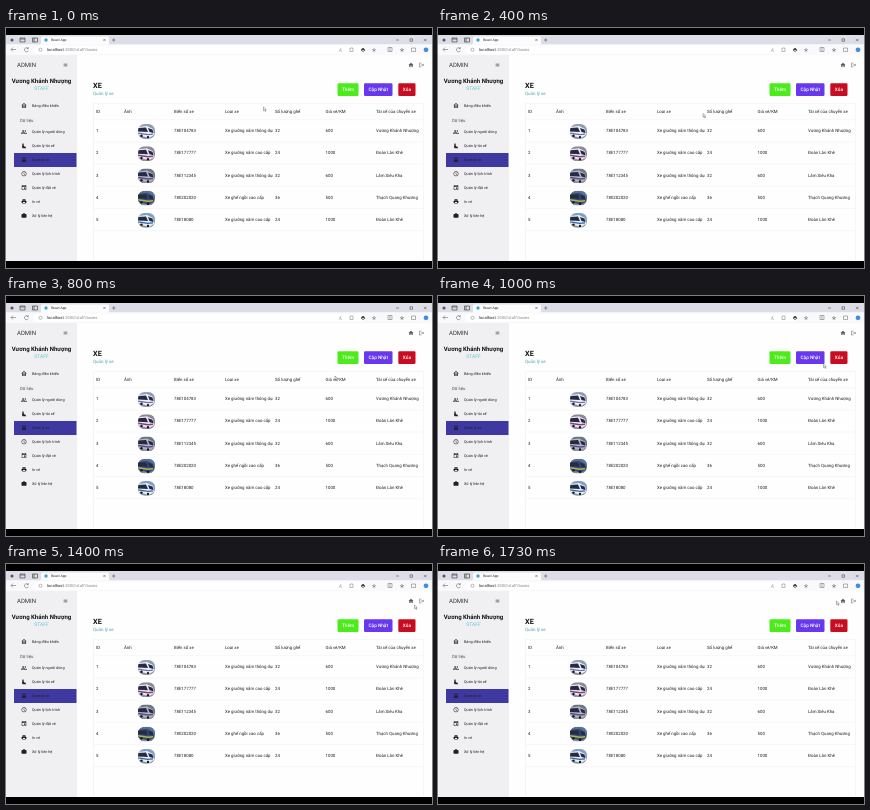
Write an HTML page that moves like this. It is 426 px wide and 240 px high and loops after 1790 ms.

```html
<!DOCTYPE html>
<html lang="vi">
<head>
<meta charset="utf-8">
<title>React App</title>
<style>
html, body { margin: 0; width: 100%; height: 100%; overflow: hidden; background: #000; }
svg { display: block; width: 100vw; height: 100vh; }
text { font-family: Roboto, "Noto Sans", sans-serif; text-rendering: geometricPrecision; white-space: pre; }
</style>
</head>
<body>
<svg id="stage" viewBox="0 0 426 240">
  <clipPath id="photo"><rect width="17" height="14.6" rx="6.5"/></clipPath>
  <clipPath id="type"><rect x="215" y="75" width="51.6" height="158"/></clipPath>
</svg>
<script>
const stage = document.getElementById('stage');
const INK = '#202124', LINE = '#efeff2';

function add(tag, attrs, parent = stage) {
  const el = document.createElementNS('http://www.w3.org/2000/svg', tag);
  for (const key in attrs) el.setAttribute(key, attrs[key]);
  return parent.appendChild(el);
}
const rect = (x, y, width, height, fill, rx = 0, parent) =>
  add('rect', { x, y, width, height, fill, rx }, parent);
const dot = (cx, cy, r, fill, parent) => add('circle', { cx, cy, r, fill }, parent);
const shape = (d, fill, parent) => add('path', { d, fill }, parent);
const stroke = (d, color = '#555', width = .6, parent) =>
  add('path', { d, fill: 'none', stroke: color, 'stroke-width': width }, parent);
function label(x, y, size, content, fill = INK, more = {}) {
  add('text', { x, y, 'font-size': size, fill, ...more }).textContent = content;
}
// Icons are drawn on a 24-unit grid, centred on (x, y).
function icon(name, x, y, size = 6, fill = INK) {
  add('path', {
    d: icons[name], fill, 'fill-rule': 'evenodd',
    transform: `translate(${x - size / 2} ${y - size / 2}) scale(${size / 24})`
  });
}
const icons = {
  home: 'M10 20v-6h4v6h5v-8h3L12 3 2 12h3v8z',
  house: 'M12 2L1 12h3v9h7v-6h2v6h7v-9h3zM7 18v-8l5-4.3 5 4.3v8h-2v-6H9v6z',
  people: 'M9 4a4 4 0 1 0 .01 0zm0 2a2 2 0 1 1-.01 0zM1 20v-3c0-5 16-5 16 0v3zm2-2h12c0-4-12-4-12 0zM15 4c6 0 6 8 0 8 2-2 2-6 0-8zM18 14c3 .5 5 2 5 4v2h-4v-3z',
  driver: 'M8 2a3 3 0 1 0 .01 0zM5 9h6l2 5h4l4 7H7l-3-4z',
  bus: 'M4 16c0 1 .4 1.7 1 2.2V21h3v-2h8v2h3v-2.8c.6-.5 1-1.2 1-2.2V6c0-3.5-3.6-4-8-4s-8 .5-8 4zM6 6h12v5H6z',
  clock: 'M12 2a10 10 0 1 0 .01 0zm0 2a8 8 0 1 1-.01 0zM11 6h2v6l4 3-1 1.5-5-3.5z',
  event: 'M19 4h-1V2h-2v2H8V2H6v2H3v18h18V4zm0 16H5V9h14zM12 12h5v5h-5z',
  print: 'M19 8H5l-3 3v6h4v4h12v-4h4v-6zM16 19H8v-5h8zM18 3H6v4h12z',
  work: 'M20 6h-4V4l-2-2h-4L8 4v2H4L2 8v11l2 2h16l2-2V8zM14 6h-4V4h4z',
  exit: 'M17 7l-1.4 1.4 2.6 2.6H8v2h10.2l-2.6 2.6L17 17l5-5zM4 5h8V3H4L2 5v14l2 2h8v-2H4z',
  menu: 'M3 6h18v2H3zM3 11h18v2H3zM3 16h18v2H3z',
  star: 'M12 1l3 8 8 .5-6 5 2 8-7-4-7 4 2-8-6-5L9 9zM12 7l-1.500 4-4 .5 3 2.500-1 4 3.500-2 3.500 2-1-4 3-2.500-4-.5z'
};

function browser() {
  rect(0, 7, 426, 226, '#fefefe');
  rect(0, 7, 426, 9.500, '#dcdde6');
  dot(6, 12, 1.600, '#55595f');
  stroke('M14 10h5v4h-5zM14 11h5', '#333');
  stroke('M26.500 10h5v4h-5zM28 10v4', '#333');
  rect(35, 8.500, 68, 9, '#fcfcfd', 1.500);
  dot(40, 12, 1.700, '#37a9c4');
  label(45, 13.300, 3.400, 'React App');
  stroke('M97.300 10.800l2.200 2.200m0-2.200l-2.200 2.200M106 12h3.500m-1.750-1.750v3.500', '#444', .5);
  stroke('M390 12h3M404 10.800h2.500v2.500h-2.500zM418 10.800l2.500 2.500m0-2.500l-2.500 2.500', '#333', .5);

  rect(0, 16.500, 426, 10.700, '#f9f9fc');
  rect(28, 17.800, 330, 8, '#fff', 4);
  stroke('M10 21.500H5m2-2l-2 2 2 2M22 20.500a2 2 0 1 0 .3 2M22.300 19v1.700h-1.700', '#555', .5);
  add('circle', { cx: 34.500, cy: 21.800, r: 1.600, fill: 'none', stroke: '#777', 'stroke-width': .5 });
  label(41, 23.300, 4.100, 'localhost', INK);
  label(58.300, 23.300, 4.100, ':3000/staff/buses', '#888');
  stroke('M333 23.500l2-3.500m-1 2.500l2 1M344 20h3v3.500h-3z', '#777', .5);
  icon('print', 357, 21.700, 4.500, '#333');
  icon('star', 368, 21.700, 4.500, '#666');
  stroke('M382 19.500h4v4h-4zM384 19.500v4', '#666', .5);
  icon('star', 396, 21.700, 4.500, '#555');
  stroke('M405.500 20h4v3.500h-4z', '#666', .5);
  dot(420, 21.800, 2.400, '#3f8fe0');
}

function sidebar() {
  rect(0, 27, 71, 206, '#f0eff2');
  label(11, 39.200, 6, 'ADMIN', '#33343a');
  icon('menu', 59.500, 37, 5, '#555');
  label(35.500, 55.200, 6, 'Vương Khánh Nhượng', '#141414', { 'font-weight': 700, 'text-anchor': 'middle' });
  label(35.500, 62, 5, 'STAFF', '#68c5d2', { 'text-anchor': 'middle' });
  label(14, 94, 4.300, 'Dữ liệu', '#4a4a4e');
  rect(8, 125, 62.500, 14, '#3f38a0');
  const items = [
    [77.500, 'house', 'Bảng điều khiển'], [104, 'people', 'Quản lý người dùng'],
    [118, 'driver', 'Quản lý tài xế'], [132, 'bus', 'Quản lý xe'],
    [145.700, 'clock', 'Quản lý lịch trình'], [159.600, 'event', 'Quản lý đặt vé'],
    [173.500, 'print', 'In vé'], [187.400, 'work', 'Xử lý liên hệ']
  ];
  for (const [y, name, title] of items) {
    icon(name, 18, y, 6);
    label(26, y + 1.300, 3.800, title);
  }
}

// A coach seen from its front corner, standing on a road.
function photo(y, sky, body, trim) {
  const g = add('g', { transform: `translate(132 ${y})`, 'clip-path': 'url(#photo)' });
  rect(0, 0, 17, 14.600, sky, 0, g);
  shape('M0 9l17 2v4H0z', '#8b9098', g);
  shape('M0 3l9-1 6 3 1 6-5 3-11-3z', body, g);
  shape('M0 4l8-.5 2 4.500-10-.5zM10 4l4.500 1.500 1 3.500-4-1z', '#252b42', g);
  stroke('M0 9l10 1.500 5-.5', trim, 1.400, g);
  dot(3.500, 11.700, 1.200, '#16181d', g);
  dot(10, 13, 1.200, '#16181d', g);
}

function button(x, width, fill, title) {
  rect(x, 55.300, width, 12.700, fill, 1.200);
  label(x + width / 2, 63.300, 4.700, title, '#fff', { 'text-anchor': 'middle', 'font-weight': 500 });
}

function content() {
  icon('home', 405, 37, 6, '#555');
  icon('exit', 415.500, 37, 6, '#666');
  label(87, 59.500, 7.300, 'XE', '#141414', { 'font-weight': 700 });
  label(87, 67, 4.500, 'Quản lý xe', '#55a3b2');
  button(331.500, 21, '#4cec1c', 'Thêm');
  button(358, 28.500, '#6838ee', 'Cập Nhật');
  button(392.300, 17.200, '#c80d22', 'Xóa');

  stroke('M87.500 233V75.500H417.500V233', LINE, .5);
  const columns = [90, 118, 168, 219, 269, 319.500, 370];
  const titles = ['ID', 'Ảnh', 'Biển số xe', 'Loại xe', 'Số lượng ghế', 'Giá vé/KM', 'Tài xế của chuyến xe'];
  titles.forEach((title, i) => label(columns[i], 85.400, 4.350, title));
  stroke('M87.500 91.700H417.500', LINE, .5);

  const common = 'Xe giường nằm thông dụng', premium = 'Xe giường nằm cao cấp';
  const rows = [
    ['78E104783', common, 32, 600, 'Vương Khánh Nhượng'],
    ['78E177777', premium, 24, 1000, 'Đoàn Lân Khê'],
    ['78E112345', common, 32, 600, 'Lâm Siêu Kha'],
    ['78E202020', 'Xe ghế ngồi cao cấp', 36, 500, 'Thạch Quang Khương'],
    ['78E18080', premium, 24, 1000, 'Đoàn Lân Khê']
  ];
  const paints = [
    ['#8f9cb4', '#f0f1f8', '#6a70b4'], ['#8d8598', '#ece6f0', '#8b3f7a'],
    ['#6c7480', '#b4b6c6', '#5c4f88'], ['#56709c', '#3c4a70', '#a4b858'],
    ['#7f9fc4', '#e8eef6', '#3566a8']
  ];
  rows.forEach((row, i) => {
    const y = 102.700 + 22.200 * i;
    label(90, y + 1.500, 4.350, i + 1);
    photo(y - 6.600, ...paints[i]);
    row.forEach((cell, j) => label(columns[j + 2], y + 1.500, 4.350, cell, INK,
      j === 1 ? { 'clip-path': 'url(#type)' } : {}));
    stroke(`M87.500 ${y + 11.200}H417.500`, LINE, .5);
  });
}

browser();
sidebar();
content();
const pointer = add('path', {
  d: 'M0 0v3.700l.9-.8.700 1.500.7-.3-.7-1.400h1.200z',
  fill: '#fff', stroke: '#444', 'stroke-width': .4
});

const LOOP = 1790, STEP = 200 / 3;
const path = [
  [0, 257.500, 79], [200, 257.500, 79], [600, 272.500, 92], [1000, 385.500, 68],
  [1200, 411.500, 45], [1400, 408.500, 41], [1733, 398.500, 37]
];

function draw(now) {
  const t = Math.min(26, Math.floor((now % LOOP + 4) / STEP)) * STEP;
  let i = 1;
  while (i < path.length - 1 && t > path[i][0]) i++;
  const [t0, x0, y0] = path[i - 1], [t1, x1, y1] = path[i];
  const k = Math.min(1, (t - t0) / (t1 - t0));
  pointer.setAttribute('transform', `translate(${x0 + (x1 - x0) * k} ${y0 + (y1 - y0) * k})`);
}
const start = performance.now();
function tick() {
  draw(performance.now() - start);
  requestAnimationFrame(tick);
}
tick();
</script>
</body>
</html>
```
